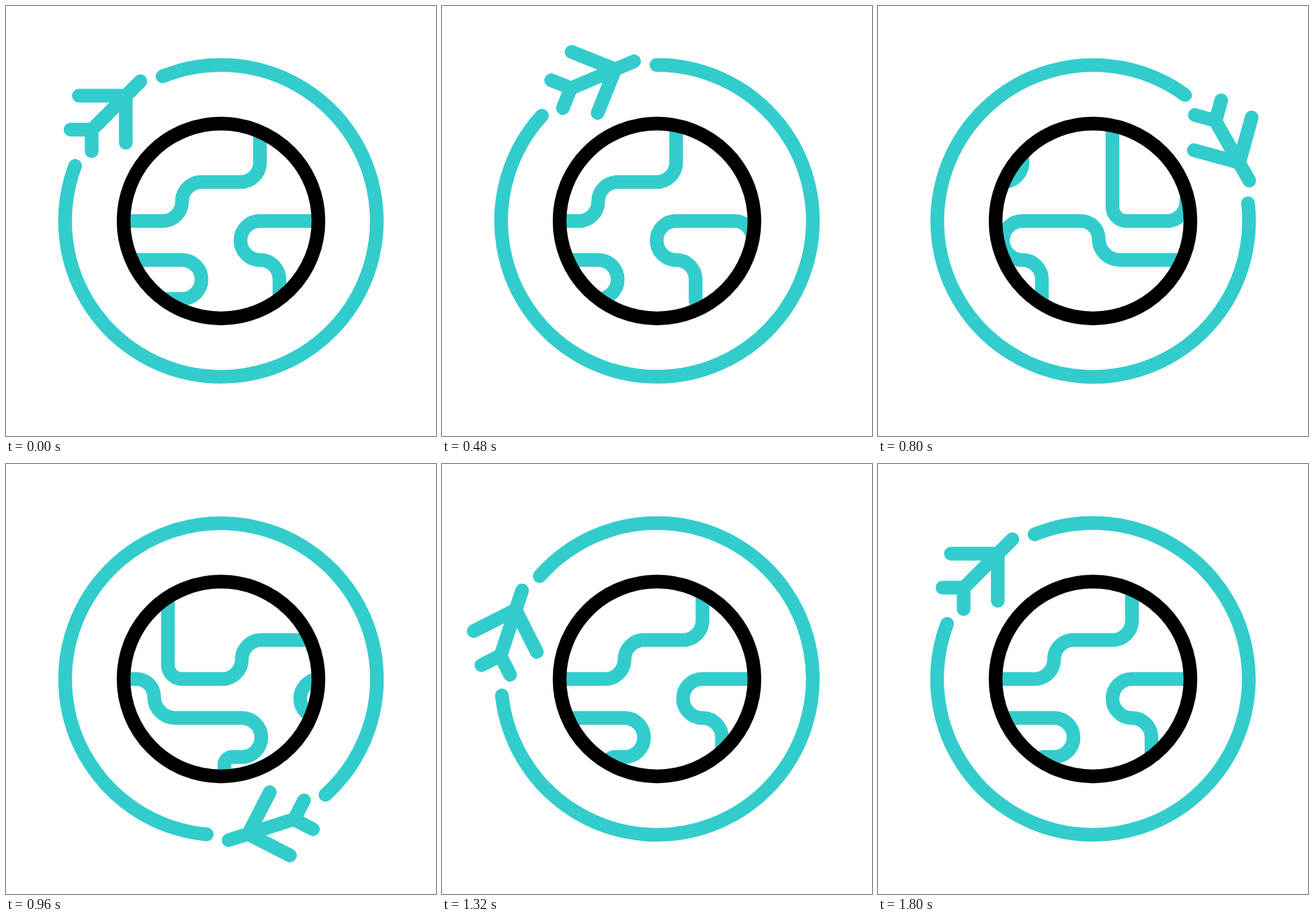
An HTML page for the animation above (1920 ms loop, 640 by 640 pixels).

```html
<!DOCTYPE html>
<html lang="en">
<head>
<meta charset="utf-8">
<title>Around the world</title>
<style>
  html, body { margin: 0; width: 100%; height: 100%; overflow: hidden; background: #fff; }
  svg { display: block; width: 100%; height: 100%; }
</style>
</head>
<body>
<svg viewBox="0 0 640 640" fill="none" stroke="#33cccc" stroke-width="20.4" stroke-linecap="round" stroke-linejoin="round">
  <defs>
    <clipPath id="disc"><circle cx="320" cy="320" r="145"/></clipPath>
    <path id="north" d="M512 150V299a21 21 0 0 0 21 21H593a29 29 0 0 0 29-29a29 29 0 0 1 29-29H709a29 29 0 0 0 29-29V150"/>
    <path id="south" d="M436 465a29 29 0 0 1-29-29V407a29 29 0 0 0-29-29a29 29 0 0 1 0-58H465a26.5 26.5 0 0 1 26.5 26.5a31.5 31.5 0 0 0 31.5 31.5H622a29 29 0 0 1 0 58H608a12 12 0 0 0-12 12V470"/>
  </defs>

  <g clip-path="url(#disc)">
    <g id="map">
      <use href="#north" x="-360"/>
      <use href="#north"/>
      <path d="M140 378H262a29 29 0 0 1 0 58H200"/>
      <use href="#south"/>
      <use href="#south" x="360"/>
    </g>
  </g>
  <circle cx="320" cy="320" r="145" stroke="#000"/>

  <g id="orbit">
    <path d="M233 104.7A232 232 0 1 1 102.8 238"/>
    <path d="M200 112L128 184M108.5 133.5H178.300V203.500M96 184H127.500V216"/>
  </g>
</svg>
<script>
  const LOOP = 1920, STEP = 40, START = 40;
  const map = document.getElementById('map');
  const orbit = document.getElementById('orbit');

  // Cubic Bezier easing with handles (0.711, 0) and (0.296, 1)
  function ease(x) {
    x = Math.min(1, Math.max(0, x));
    let lo = 0, hi = 1;
    for (let i = 0; i < 30; i++) {
      const s = (lo + hi) / 2, r = 1 - s;
      if (3 * 0.711 * s * r * r + 3 * 0.296 * s * s * r + s ** 3 < x) lo = s;
      else hi = s;
    }
    return lo * lo * (3 - 2 * lo);
  }

  function draw(now) {
    // Motion advances in 40 ms steps; the small bias absorbs timer jitter
    const t = Math.floor(((now + 3) % LOOP) / STEP) * STEP - START;
    map.setAttribute('transform', `translate(${-360 * ease(t / 1555)} 0)`);
    orbit.setAttribute('transform', `rotate(${360 * ease(t / 1752)} 320 320)`);
  }

  const begin = performance.now();
  function tick() {
    draw(performance.now() - begin);
    requestAnimationFrame(tick);
  }
  tick();
</script>
</body>
</html>
```
